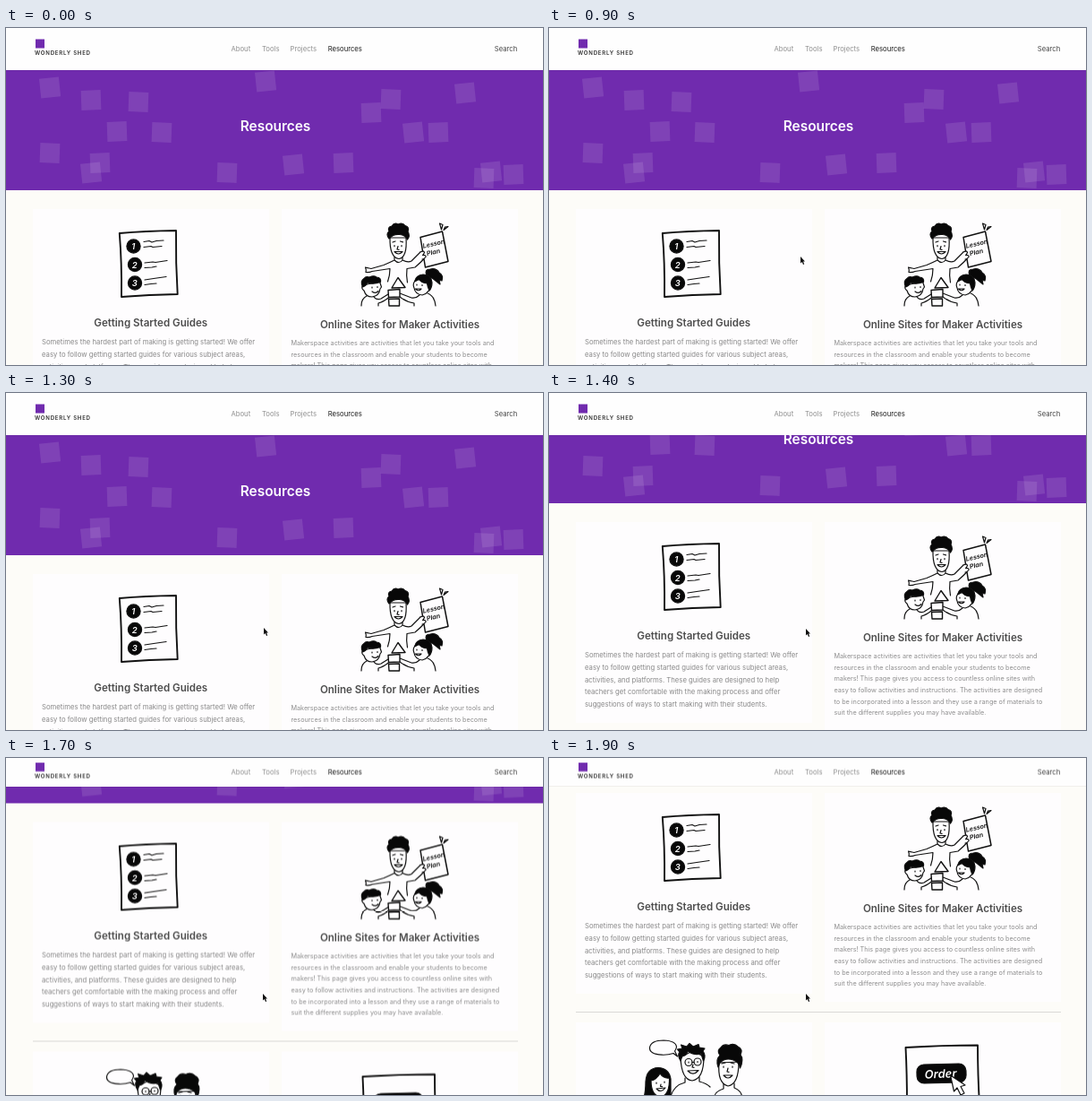
These frames come from a looping animation (600x376 px, 3.2 s). An HTML page:

```html
<!DOCTYPE html>
<html lang="en">
<head>
<meta charset="utf-8">
<title>Resources</title>
<style>
  html, body { margin: 0; width: 100%; height: 100%; overflow: hidden; background: #fdfcf8; }
  svg { display: block; width: 600px; height: 376px; font-family: Inter, "Open Sans", sans-serif; }
  .page, .bar, .menu, .pointer { animation: 3.2s step-end infinite; }
  .page { animation-name: scroll; }
  .bar { animation-name: shrink; }
  .menu { animation-name: lift; }
  .pointer { animation-name: point; }

  @keyframes scroll {
    0% { transform: translateY(0); }
    43.75% { transform: translateY(-58px); }
    46.875% { transform: translateY(-119px); }
    50% { transform: translateY(-128px); }
    53.125% { transform: translateY(-130.5px); }
    56.25% { transform: translateY(-138.5px); }
    59.375%, 100% { transform: translateY(-163px); }
  }
  @keyframes shrink {
    0% { transform: translateY(0); }
    46.875% { transform: translateY(-9px); }
    50% { transform: translateY(-13.5px); }
    53.125% { transform: translateY(-15px); }
    59.375%, 100% { transform: translateY(-16px); }
  }
  @keyframes lift {
    0% { transform: translateY(0); }
    46.875% { transform: translateY(-4.5px); }
    50% { transform: translateY(-6.7px); }
    53.125%, 100% { transform: translateY(-7.5px); }
  }
  @keyframes point {
    0% { transform: translate(281px, 255px); opacity: 0; }
    28.125% { transform: translate(281px, 255px); opacity: 1; }
    31.25% { transform: translate(284px, 258px); opacity: 1; }
    34.375% { transform: translate(286.5px, 260.5px); opacity: 1; }
    37.5% { transform: translate(288px, 262px); opacity: 1; }
    43.75%, 100% { transform: translate(287px, 263px); opacity: 1; }
  }

  .nav { font-size: 7.7px; fill: #8f8f8f; }
  .brand { font-size: 6.1px; font-weight: 600; letter-spacing: .75px; fill: #333; }
  .title { font-size: 15.4px; font-weight: 600; fill: #fff; text-anchor: middle; }
  .head { font-size: 11.55px; font-weight: 600; fill: #4d4d4d; text-anchor: middle; }
  .body { font-size: 7.73px; fill: #888; }
  .small { font-size: 7.24px; fill: #8e8e8e; }
  .art { fill: none; stroke: #111; stroke-width: 1.2; stroke-linecap: round; stroke-linejoin: round; }
  .art .ink { fill: #080808; }
  .art .skin { fill: #fefdfe; }
  .art text { stroke: none; fill: #fff; font-weight: 600; font-style: italic; text-anchor: middle; }
  .art .note { fill: #111; font-size: 7.2px; }
</style>
</head>
<body>
<svg viewBox="0 0 600 376">
  <defs>
    <clipPath id="banner"><rect y="47" width="600" height="134"/></clipPath>
  </defs>
  <rect width="600" height="376" fill="#fdfcf8"/>

  <g class="page">
    <g clip-path="url(#banner)">
      <rect y="47" width="600" height="134" fill="#702bae"/>
      <g id="tiles" fill="#fff" fill-opacity=".11"></g>
    </g>
    <text class="title" x="301" y="114.6">Resources</text>

    <g fill="#fefdfe">
      <rect x="30" y="202" width="264" height="224"/>
      <rect x="308" y="202" width="264" height="233"/>
      <rect x="30" y="458" width="264" height="224"/>
      <rect x="308" y="458" width="264" height="224"/>
    </g>
    <path d="M30 446.5H572" stroke="#d9d9d7"/>

    <text class="head" x="161.7" y="333">Getting Started Guides</text>
    <text class="head" x="440" y="334.6">Online Sites for Maker Activities</text>
    <text class="body" id="guides"></text>
    <text class="small" id="sites"></text>

    <!-- checklist -->
    <g class="art">
      <path stroke-width="1.9" d="M126.8 229Q155 226.5 190 226Q189.5 262 191.7 297Q160 297.5 129 300Q129.500 262 126.800 229Z"/>
      <g class="ink">
        <circle cx="142.500" cy="243.500" r="7.600"/>
        <circle cx="144" cy="264" r="7.600"/>
        <circle cx="144" cy="284.500" r="7.600"/>
      </g>
      <g font-size="9.500">
        <text x="142.300" y="247">1</text>
        <text x="143.800" y="267.500">2</text>
        <text x="143.800" y="288">3</text>
      </g>
      <path d="M154 238.500l6-1 3 1.500 5-1.500 8-.5M154 244.500l8-1 2 1 10-1
               M155 262l9-1 3 .5 13-2M155 267.500l8-.5 5-1M155 281l10-1.500 14-2M155 286.500l7-1 6-.5"/>
    </g>

    <!-- teacher and pupils -->
    <g class="art">
      <path d="M434 254v5Q428 262 422 264.500L408 268.500Q403 267.500 401.500 267M401.500 267Q403 270.500 402 272.500Q406 273 409 271.500L429 268.500Q429 276 426.500 283
               M443 254v5Q449 262 453 260L463 250M448 268.500L457 267Q463 262 468 256.500M448 268.500Q447 276 448.500 284M434 259Q439 264 443 259"/>
      <path class="skin" d="M429 234Q428.500 256 439 257.500Q448.500 256 447 234Z"/>
      <path class="ink" d="M428 235Q424 230 428 227Q426 222 431 221Q434 216.500 438 219Q443 216.500 446 220.500Q451 222 449 227Q452 232 448.500 236Q446 231 440 230.500Q433 229.500 428 235Z"/>
      <path d="M434 242.500v1.200M442 242.500v1.200M432 239l3-1M440.500 238l3 .8M438 243.500l-1 3.500 2 .3M434 249.500Q438.500 254.500 443 249.500Z"/>
      <path class="skin" stroke-width="1.500" d="M463 233.500L487.500 227L494 260.500L468.500 267Z"/>
      <path class="skin" d="M463 250q4-2 4.500 .5-1 2.500-2 3 4-.5 3.500 2-2 2.500-4 2.500"/>
      <text class="note" transform="translate(478.500 243) rotate(-13)">Lesson</text>
      <text class="note" transform="translate(478 252.500) rotate(-13)">Plan</text>
      <path d="M484.500 218l2 7 1.500-5.500zM489 225.500l5-4-3.500 .5z"/>

      <path class="skin" d="M399 287Q396 290 400 293Q402 300 409 300Q417 299 418 291L419.500 289L417.500 283Z"/>
      <path class="ink" d="M398.500 289Q395.500 282 400 279.500Q402 276.500 406 278Q411 275.500 414 278Q419.500 278.500 418.500 283.500Q410 286.500 404 284Q402 288 398.500 289Z"/>
      <path d="M409 289v1M415 288.500v1M409 294Q413 297 416 293.500M403 299Q397 302 397 310M411 300Q414 304 419 302L427 297M428 300.500Q421 306 416 307v3"/>

      <path class="ink" d="M470 276Q467 269 474 269Q481 267.500 484 273Q489 276 487 282L484 281.500L485 286L480 282Q477 279 473 278Z"/>
      <path class="skin" d="M457 282Q454 286 456 290Q457 297 465 298Q474 296 474.500 285Q470 277 457 282Z"/>
      <path class="ink" d="M456.500 283Q458 275.500 466 275Q475 275 476 284Q476 290 473 293Q471 289 470.500 285Q464 284.500 461 280Q459 282 456.500 283Z"/>
      <path d="M459 286v1M465 286.500v1M457.500 291Q461 294.500 464 291Z"/>
      <path d="M462 298Q458 302 453 301L440 296M440 300Q448 306 456 307v3M471 296Q479 299 480 310"/>

      <path class="skin" stroke-width="1.400" d="M431 290L438 278.500L446 289.500ZM427 292.500L440 291.500V300L427.500 300.500ZM427.500 302.500L439.500 302V310H428Z"/>
    </g>

    <!-- group chat -->
    <g class="art">
      <path d="M139 492.500Q133 494.500 126 494.200Q112 493.500 112.500 486Q114 478 128 478Q142 478.500 142.500 485.500Q142 488 140.500 490L143.500 496Z"/>
      <path d="M152 520v5Q140 528 136 540M168 519v5Q176 526 180 530"/>
      <path class="skin" d="M147 497Q148 522 160 523Q173 521 173 496L160 490Z"/>
      <path class="ink" d="M147 501Q143 494 146 491L143.500 488L149 487L147.500 483L154 485L157 481.500L161 485L167 482.500L168 486L174 487L172 490Q176 495 172.500 501L170 493Q161 495 155 490Q153 496 149 495Z"/>
      <circle cx="156" cy="502.500" r="4"/><circle cx="166" cy="502" r="4"/>
      <path d="M160 502.500h2M156 502v1M166 501.500v1M161 505l-1 3 2 .4M155 512Q161 518.500 167 511.500Z"/>

      <path d="M195 526v6Q186 535 185 540M207 526v5Q215 534 216 542"/>
      <path class="skin" d="M190 503Q188 526 200 529Q212 527 212 502Z"/>
      <path class="ink" d="M189 508Q186 499 191 495Q187 489 192 486Q195 481.500 201 483.500Q207 480.500 211 485Q217 488 214 494Q218 499 213.500 509Q212 502 206 500Q197 497 191 503Z"/>
      <path d="M195 507v1.200M205 507v1.200M193 504l4-1M203 503l4 1M200 509l-1 4 2 .4M195 517Q200 523 205 517Z"/>

      <path class="ink" d="M106 542Q108 535 108 524Q109 509 122 508.500Q134 509 136 521V542Z"/>
      <path class="skin" d="M114 523Q114 540 125 541Q135 539 134.500 520Q128 521 124 515Q120 522 114 523Z"/>
      <path d="M120 525v1.200M129 524v1.200M125 527l-.5 2.500 2 .2M120 532Q125 537.500 130 531Z"/>
    </g>

    <!-- order button -->
    <g class="art">
      <path stroke-width="1.900" d="M398.500 486Q440 483.500 479 483.500Q479 515 481 550H400Q400 515 398.500 486Z"/>
      <rect class="ink" x="411" y="504.500" width="55" height="21" rx="8" transform="rotate(-1.500 438 515)"/>
      <text x="437.500" y="520" font-size="13" transform="rotate(-2 438 515)">Order</text>
      <path class="skin" d="M448.500 517L452.500 535L456 531L460 539L464 537L460 529.500L465 528Z"/>
    </g>
  </g>

  <g class="bar">
    <rect y="-20" width="600" height="67.600" fill="#000" opacity=".08"/>
    <rect y="-20" width="600" height="67" fill="#fefefe"/>
  </g>
  <g class="menu">
    <rect x="33" y="12.500" width="10" height="10" fill="#702bae"/>
    <text class="brand" x="32" y="29.700">WONDERLY SHED</text>
    <g class="nav">
      <text x="251.500" y="25.700">About</text>
      <text x="286" y="25.700">Tools</text>
      <text x="317.500" y="25.700">Projects</text>
      <text x="359.700" y="25.700" fill="#1c1c1c">Resources</text>
      <text x="545.800" y="25.700" fill="#444">Search</text>
    </g>
  </g>

  <path class="pointer" d="M0 0V7.500L1.700 6L3 8.900L4.200 8.400L3 5.600H5Z" fill="#111" stroke="#fff" stroke-width=".5" paint-order="stroke"/>
</svg>
<script>
  const NS = "http://www.w3.org/2000/svg";
  const add = (parent, tag, attrs, text = "") => {
    const el = document.createElementNS(NS, tag);
    for (const key in attrs) el.setAttribute(key, attrs[key]);
    el.textContent = text;
    parent.append(el);
  };

  const spots = [
    [49, 66], [95, 80], [148, 82], [290, 59], [408, 94], [430, 79], [513, 72],
    [124, 115], [174, 116], [455, 116], [483, 116], [49, 139], [95, 161], [105, 150],
    [247, 161], [321, 152], [377, 150], [534, 167], [542, 160], [567, 163]
  ];
  const tiles = document.getElementById("tiles");
  spots.forEach(([x, y], i) => add(tiles, "rect", {
    x: x - 11, y: y - 10.5, width: 22, height: 22,
    transform: `rotate(${i % 3 * 4 - 6} ${x} ${y})`
  }));

  const write = (id, x, y, gap, lines) => lines.forEach((line, i) =>
    add(document.getElementById(id), "tspan", { x, y: y + gap * i }, line));

  write("guides", 40, 353.2, 13.7, [
    "Sometimes the hardest part of making is getting started! We offer",
    "easy to follow getting started guides for various subject areas,",
    "activities, and platforms. These guides are designed to help",
    "teachers get comfortable with the making process and offer",
    "suggestions of ways to start making with their students."
  ]);
  write("sites", 318.5, 354, 12.65, [
    "Makerspace activities are activities that let you take your tools and",
    "resources in the classroom and enable your students to become",
    "makers! This page gives you access to countless online sites with",
    "easy to follow activities and instructions. The activities are designed",
    "to be incorporated into a lesson and they use a range of materials to",
    "suit the different supplies you may have available."
  ]);
</script>
</body>
</html>
```
